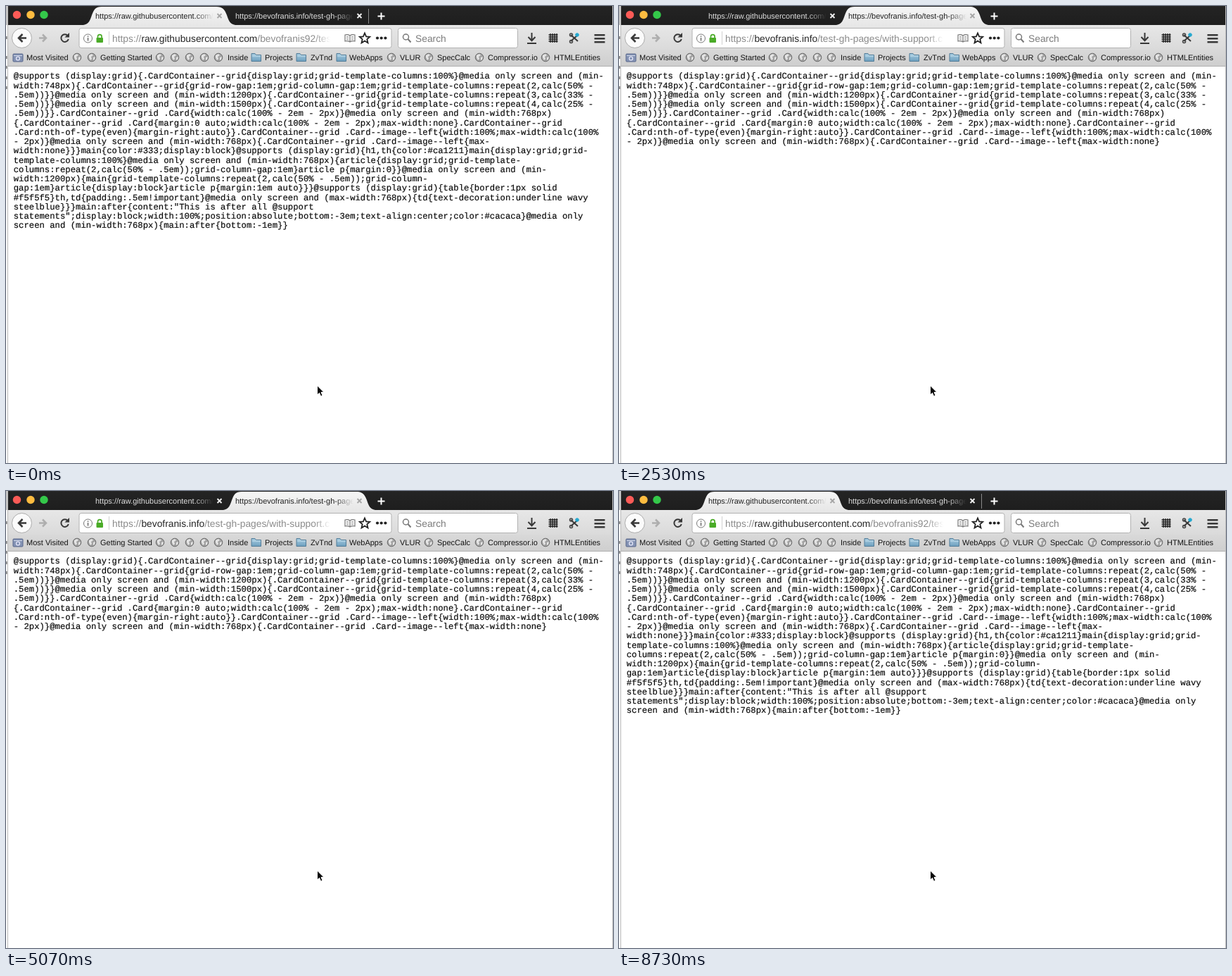
Recreate the animation shown at these times as an HTML page. Size 863x649 px, loop 8790 ms.

```html
<!DOCTYPE html>
<html lang="en">
<head>
<meta charset="utf-8">
<title>Browser tabs</title>
<style>
  html, body { margin: 0; width: 100%; height: 100%; overflow: hidden; background: #fff; }
  svg { display: block; width: 863px; height: 649px; }
  text { font-family: "Liberation Sans", Arial, sans-serif; font-size: 11px; text-rendering: geometricPrecision; }
  .code text { font-family: "Liberation Mono", "Courier New", monospace; font-size: 12.28px; fill: #0c0c0c; stroke: #0c0c0c; stroke-width: .2px; }
  .url text { font-size: 13.8px; fill: #8b8b8b; }
  .url tspan { fill: #262626; }
  .line { fill: none; stroke: #383838; stroke-width: 2; }
</style>
</head>
<body>
<svg id="stage" viewBox="0 0 863 649"></svg>
<script>
const LOOP = 8790;
// Times at which the other tab comes to the front.
const SWITCHES = [400, 1270, 2200, 3470, 4700, 6400];

const COMMON = `@supports (display:grid){.CardContainer--grid{display:grid;grid-template-columns:100%}@media only screen and (min-
width:748px){.CardContainer--grid{grid-row-gap:1em;grid-column-gap:1em;grid-template-columns:repeat(2,calc(50% -
.5em))}}@media only screen and (min-width:1200px){.CardContainer--grid{grid-template-columns:repeat(3,calc(33% -
.5em))}}@media only screen and (min-width:1500px){.CardContainer--grid{grid-template-columns:repeat(4,calc(25% -
.5em))}}.CardContainer--grid .Card{width:calc(100% - 2em - 2px)}@media only screen and (min-width:768px)
{.CardContainer--grid .Card{margin:0 auto;width:calc(100% - 2em - 2px);max-width:none}.CardContainer--grid
.Card:nth-of-type(even){margin-right:auto}}.CardContainer--grid .Card--image--left{width:100%;max-width:calc(100%
- 2px)}@media only screen and (min-width:768px){.CardContainer--grid .Card--image--left{max-`;

const LONG_TAIL = `
width:none}}}main{color:#333;display:block}@supports (display:grid){h1,th{color:#ca1211}main{display:grid;grid-
template-columns:100%}@media only screen and (min-width:768px){article{display:grid;grid-template-
columns:repeat(2,calc(50% - .5em));grid-column-gap:1em}article p{margin:0}}@media only screen and (min-
width:1200px){main{grid-template-columns:repeat(2,calc(50% - .5em));grid-column-
gap:1em}article{display:block}article p{margin:1em auto}}}@supports (display:grid){table{border:1px solid
#f5f5f5}th,td{padding:.5em!important}@media only screen and (max-width:768px){td{text-decoration:underline wavy
steelblue}}}main:after{content:"This is after all @support
statements";display:block;width:100%;position:absolute;bottom:-3em;text-align:center;color:#cacaca}@media only
screen and (min-width:768px){main:after{bottom:-1em}}`;

const pages = [
  { tab: "https://raw.githubusercontent.com/", code: COMMON + LONG_TAIL,
    url: "https://<tspan>raw.githubusercontent.com</tspan>/bevofranis92/test" },
  { tab: "https://bevofranis.info/test-gh-pages", code: COMMON + "width:none}",
    url: "https://<tspan>bevofranis.info</tspan>/test-gh-pages/with-support.css" }
];

const rect = (x, y, w, h, fill, extra = "") =>
  `<rect x="${x}" y="${y}" width="${w}" height="${h}" fill="${fill}" ${extra}/>`;
const circle = (x, y, r, fill, extra = "") =>
  `<circle cx="${x}" cy="${y}" r="${r}" fill="${fill}" ${extra}/>`;
const text = (x, y, s, fill = "#222", extra = "") =>
  `<text x="${x}" y="${y}" fill="${fill}" ${extra}>${s}</text>`;
const stroke = (d, extra = "") => `<path class="line" d="${d}" ${extra}/>`;
const vertical = (id, top, bottom) =>
  `<linearGradient id="${id}" x2="0" y2="1"><stop stop-color="${top}"/><stop offset="1" stop-color="${bottom}"/></linearGradient>`;
const horizontal = (id, x1, x2, from, to) =>
  `<linearGradient id="${id}" gradientUnits="userSpaceOnUse" x1="${x1}" x2="${x2}" y1="0" y2="0"><stop stop-color="${from}"/><stop offset="1" stop-color="${to}"/></linearGradient>`;

const defs = `<defs>
  ${vertical("strip", "#242424", "#1e1e1e")}
  ${vertical("front", "#f6f6f6", "#e7e7e7")}
  ${vertical("nav", "#e7e7e7", "#dadada")}
  ${vertical("marks", "#d9d9d9", "#cecece")}
  ${vertical("folder", "#a8cde2", "#6d9fbe")}
  ${horizontal("fade", 268, 295, "#fff", "#000")}
  ${horizontal("urlFade", 438, 461, "rgba(255,255,255,0)", "#fff")}
  <mask id="tabMask" maskUnits="userSpaceOnUse" x="120" y="0" width="180" height="27">${rect(120, 0, 175, 27, "url(#fade)")}</mask>
  <clipPath id="urlClip">${rect(148, 32, 313, 27, "#fff")}</clipPath>
</defs>`;

function tab(page, index, active) {
  const ink = active ? "#222" : "#dedede";
  const shape = active
    ? `<path d="M110 27C118 26 120 19 122 13C125 5 127 1 136 1H299C308 1 311 5 314 13C316 19 318 26 326 27Z" fill="url(#front)"/>` : "";
  return `<g transform="translate(${index * 199})">${shape}
    <g mask="url(#tabMask)">${text(127, 18, page.tab, ink)}</g>
    ${stroke("M300.5 11l6 6m0-6l-6 6", `style="stroke:${active ? "#a5a5a5" : "#f5f5f5"};stroke-width:1.8"`)}</g>`;
}

function view(page, index) {
  const tabs = pages.map((p, i) => tab(p, i, i === index)).join("");
  const divider = index === 0 ? rect(515, 4, 1, 21, "#898989") : "";
  const code = page.code.split("\n").map((s, i) => text(10.7, 103.3 + 13.25 * i, s)).join("");
  return `<g class="view">${tabs}${divider}
    <g class="url" clip-path="url(#urlClip)">${text(151, 51, page.url)}${rect(438, 32, 24, 27, "url(#urlFade)")}</g>
    <g class="code">${code}</g></g>`;
}

const globe = x => `<g transform="translate(${x} 73)">${circle(0, 0, 5.8, "#a2a2a2", 'stroke="#6c6c6c"')}
  <path d="M-4-3L0-5L2-3L-1-1L0 2L-2 4L-4 0ZM2 0L5-1L4 3L2 4Z" fill="#e5e5e5"/></g>`;
const folder = x => `<path d="M${x - 7} 67.5h5l1.5 2h7v9h-13.5z" fill="url(#folder)" stroke="#527c98"/>
  <path d="M${x - 6} 71h12" stroke="#c4e0ed"/>`;

const labels = [
  [29, "Most Visited"], [134, "Getting Started"], [315, "Inside"], [368, "Projects"], [433, "ZvTnd"],
  [488, "WebApps"], [560, "VLUR"], [613, "SpecCalc"], [685, "Compressor.io"], [779, "HTMLEntities"]
];

const backdrop = rect(0, 0, 863, 649, "#fff")
  + [45, 73, 87, 102, 116].map(y => rect(0, y - 2, 1.5, 4, "#777")).join("")
  + rect(0, 0, 3, 27, "#c4c4c4") + rect(2, 27, 1, 622, "#b9b9b9") + rect(862, 0, 1, 649, "#bcbcbc")
  + rect(3, 0, 859, 27, "url(#strip)") + rect(3, 27, 859, 36, "url(#nav)")
  + rect(3, 62, 859, 23, "url(#marks)") + rect(3, 85, 859, 1, "#b0b0b0")
  + circle(15.5, 12.5, 5.7, "#fc5b57") + circle(35, 12.5, 5.7, "#fdbc40") + circle(54, 12.5, 5.7, "#34c84a")
  + stroke("M528.5 14.5h10m-5-5v10", 'style="stroke:#fff"');

const fields = [[104, 444], [557.5, 170]].map(([x, w]) =>
  rect(x, 31.5, w, 28, "#fff", 'rx="3" stroke="#b2b2b2"')).join("");

const navIcons = circle(22.5, 45.5, 14, "#fbfbfb", 'stroke="#aaa"')
  + stroke("M29 45.5H18m5.5-5.5l-5.5 5.5 5.5 5.5", 'style="stroke-width:2.5"')
  + stroke("M47 45.5h10m-5-5l5 5-5 5", 'style="stroke:#aeaeae;stroke-width:2.5"')
  + stroke("M87.8 42.2A5.3 5.3 0 1 0 88.8 47") + `<path d="M90 38v6.5h-6.5z" fill="#383838"/>`
  + circle(116.5, 46, 6, "none", 'stroke="#777"') + rect(115.8, 45, 1.5, 4.5, "#666") + rect(115.8, 42.4, 1.5, 1.5, "#666")
  + rect(128.5, 45, 9.5, 7, "#4aab27", 'rx="1"') + stroke("M130.5 46v-2.5a2.8 2.8 0 0 1 5.6 0v2.5", 'style="stroke:#4aab27;stroke-width:1.7"')
  + rect(146, 36, 1, 19, "#d0d0d0")
  + stroke("M489 42q-3-2-7-1v9q4-1 7 1q3-2 7-1v-9q-4-1-7 1v9M484 44h3m-3 3h3m4-3h3m-3 3h3", 'style="stroke:#777;stroke-width:1.2"')
  + stroke("M510 38.5l2.1 4.8 5.1.5-3.9 3.4 1.2 5.2-4.5-2.8-4.5 2.8 1.2-5.2-3.9-3.4 5.1-.5z", 'style="stroke:#222;stroke-width:1.8"')
  + [528, 533.7, 539.4].map(x => circle(x, 45.5, 2.1, "#222")).join("")
  + circle(568.5, 44, 4, "none", 'stroke="#777" stroke-width="1.5"') + stroke("M571.5 47l4 4.5", 'style="stroke:#777"')
  + text(582, 51, "Search", "#7c7c7c", 'style="font-size:13.8px"')
  + stroke("M747.5 38v11m-5-5l5 5.3 5-5.3M741 53h13")
  + stroke("M774 39v13m3-13v13m3-13v13m3-13v13M771.5 41h13m-13 3h13m-13 3h13m-13 3h13", 'style="stroke:#222;stroke-width:1.4"')
  + stroke("M803 41l10 9m-10 0l9-8") + circle(803.5, 41, 2, "none", 'stroke="#444" stroke-width="1.5"')
  + circle(803.5, 50.5, 2, "none", 'stroke="#444" stroke-width="1.5"')
  + stroke("M812 38v6m-3-3h6m-5-2l4 4m0-4l-4 4", 'style="stroke:#23a8cf;stroke-width:1.3"')
  + stroke("M836.5 41.2h15m-15 5h15m-15 5h15", 'style="stroke-width:2.4"');

const bookmarks = rect(10, 68, 14, 11, "#8493b4", 'rx="1" stroke="#59678b"') + rect(11, 70, 12, 1, "#d2d9e9")
  + circle(17, 74.5, 2.5, "none", 'stroke="#eef" stroke-width="1.2"')
  + [101, 122, 219, 240, 261, 282, 302, 548, 601, 673, 767].map(globe).join("")
  + [356, 420, 477].map(folder).join("")
  + labels.map(([x, s]) => text(x, 76.7, s, "#151515")).join("");

const pointer = `<path d="M442.5 539v13.2l3-2.7 2.2 4.8 2.4-1-2.1-4.7h4z" fill="#080808" stroke="#fff" stroke-width="1"/>`;

const stage = document.getElementById("stage");
stage.innerHTML = defs + backdrop + fields + navIcons + bookmarks + pages.map(view).join("") + pointer;
const views = [...stage.querySelectorAll(".view")];

function render() {
  const time = performance.now() % LOOP;
  const active = SWITCHES.filter(t => t <= time).length % 2;
  views.forEach((v, i) => v.style.display = i === active ? "" : "none");
  requestAnimationFrame(render);
}
render();
</script>
</body>
</html>
```
